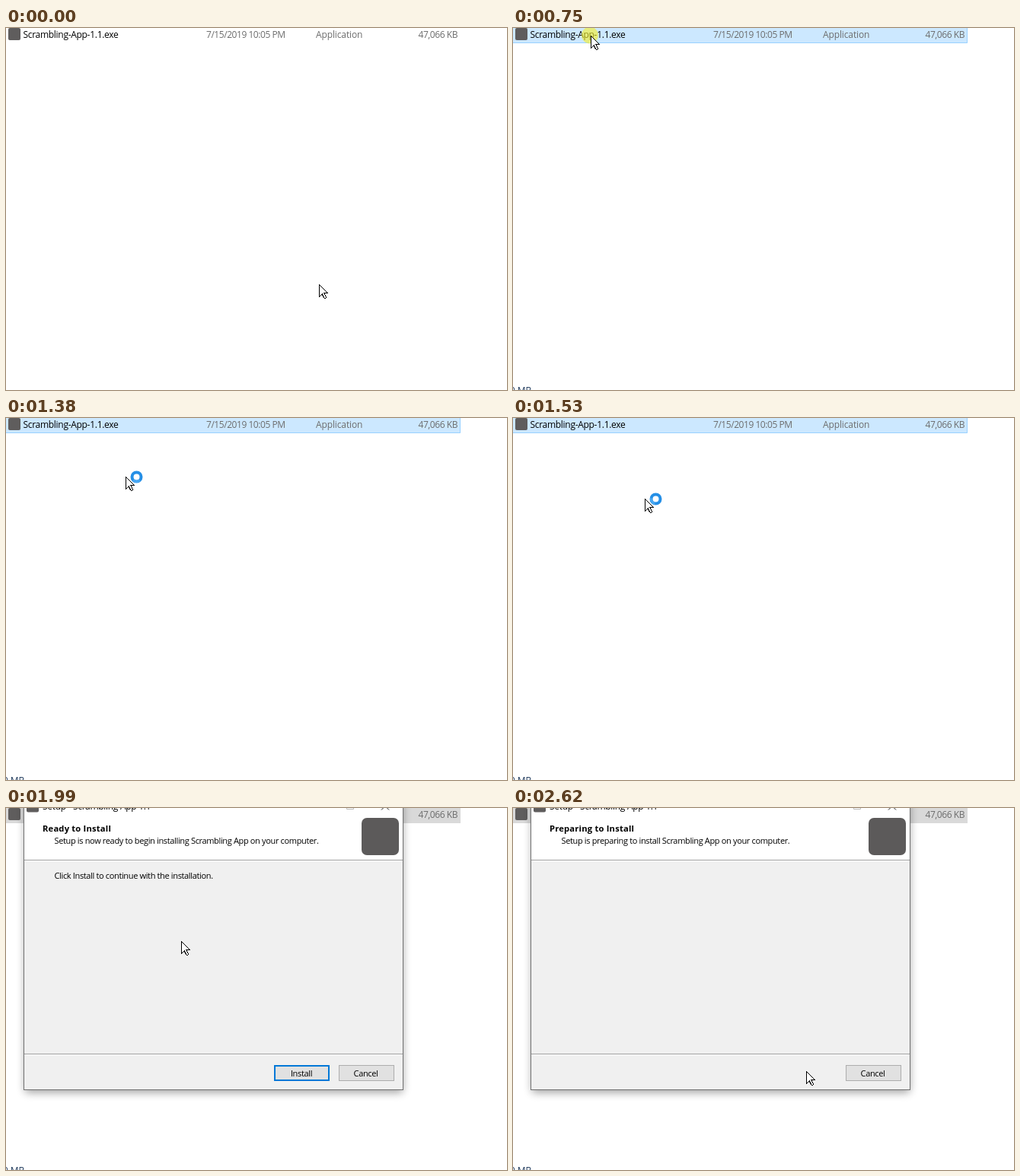
An HTML page that plays this animation: 658 px wide and 476 px high, repeating every 2.69 s.

```html
<!DOCTYPE html>
<html lang="en">
<head>
<meta charset="utf-8">
<title>Installer</title>
<style>
  html, body { margin: 0; width: 100%; height: 100%; overflow: hidden; background: #fff; }
  svg { display: block; width: 658px; height: 476px; }
  text { font-family: "Open Sans", "Noto Sans", sans-serif; fill: #000; }
  .ui { font-size: 12px; letter-spacing: -.3px; }
  .dim { fill: #6d6d6d; }
  .num { letter-spacing: -.45px; }
  .word { letter-spacing: -.12px; }
  .dlg { font-size: 11px; letter-spacing: -.35px; }
  .head { font-size: 11.2px; font-weight: 700; letter-spacing: .2px; }
  .mid { text-anchor: middle; }
</style>
</head>
<body>
<svg viewBox="0 0 658 476">
  <defs>
    <filter id="blur" x="-10%" y="-10%" width="120%" height="120%"><feGaussianBlur stdDeviation="6"/></filter>
  </defs>
  <rect width="658" height="476" fill="#fff"/>

  <g id="row">
    <rect id="rowFill" x="0" y="-2" width="597" height="22"/>
    <path id="rowEdge" d="M0 19.5H596.5V-2" fill="none" stroke="#99d1ff"/>
    <rect x="3" y="0" width="16" height="16" rx="2" fill="#5f5d5d"/>
    <text class="ui" x="22.5" y="13">Scrambling-App-1.1.exe</text>
    <text class="ui dim num" x="263" y="13">7/15/2019 10:05 PM</text>
    <text class="ui dim word" x="407" y="13">Application</text>
    <text class="ui dim num" x="593" y="13" text-anchor="end">47,066 KB</text>
  </g>
  <text id="status" class="ui word" x="-4" y="481" style="fill:#1e395b">0 MB</text>

  <g id="dialog">
    <rect x="25" y="-8" width="496" height="382" fill="#000" opacity=".38" filter="url(#blur)"/>
    <rect x="23.5" y="-20.5" width="498" height="391" fill="#f0f0f0" stroke="#707070"/>
    <rect x="24" y="-20" width="497" height="88" fill="#fff"/>
    <path d="M24 68.5H521M24 323.5H521" stroke="#a0a0a0"/>
    <path d="M24 69.5H521M24 324.5H521" stroke="#fff"/>
    <rect x="27" y="-10" width="16" height="15.5" rx="2" fill="#5f5d5d"/>
    <text class="ui" x="48" y="1.5">Setup - Scrambling App 1.1</text>
    <path d="M447.5 -7.5H456.5V1.5H447.5Z" fill="none" stroke="#bbb"/>
    <path d="M493 -7.5L503 2.5M503 -7.5L493 2.5" stroke="#222"/>
    <rect x="467" y="13" width="49" height="49" rx="7" fill="#5c5a5a"/>
    <text id="head" class="head" x="48" y="31"></text>
    <text id="sub" class="dlg" x="63.5" y="47"></text>
    <text id="hint" class="dlg" x="63.5" y="93">Click Install to continue with the installation.</text>
    <g id="install">
      <rect id="installBox" x="353" y="339" width="71" height="19" stroke-width="2"/>
      <text class="dlg mid" x="388" y="353">Install</text>
    </g>
    <rect x="437.5" y="338.5" width="72" height="20" fill="#e1e1e1" stroke="#adadad"/>
    <text class="dlg mid" x="472.5" y="353">Cancel</text>
  </g>

  <g id="pointer">
    <circle id="click" cx="-1" cy="-.5" r="11" fill="#f4ef2c" opacity=".62"/>
    <path d="M.5 .5V16.5L4.2 12.8 6.5 17.5 7.5 18.5H8.5L9.5 17.5 7 11.5H11.5Z" fill="#fff" stroke="#000" shape-rendering="crispEdges"/>
    <g id="busy" transform="translate(14.5 .5)">
      <circle r="6" fill="#fff" stroke="#258fe6" stroke-width="4"/>
      <path id="glint" d="M0 -6A6 6 0 0 1 6 0" fill="none" stroke="#4aa8f2" stroke-width="3"/>
    </g>
  </g>
</svg>
<script>
const LOOP = 2690;
const el = id => document.getElementById(id);
const show = (id, on) => { el(id).style.display = on ? "" : "none"; };
const set = (id, attrs) => { for (const k in attrs) el(id).setAttribute(k, attrs[k]); };
const within = (t, a, b) => t >= a && t < b;

// The screen refreshes only at these moments.
const ticks = [0, 70, 150, 230, 300, 380, 460, 530, 610, 750, 920, 990, 1070,
  1300, 1380, 1460, 1530, 1610, 1690, 1760, 1840, 1920, 1990, 2070, 2150, 2230,
  2310, 2390, 2460, 2540, 2620];

const linear = p => p;
const smooth = p => p * p * (3 - 2 * p);

// Pointer path: time, x, y, easing towards this point.
const path = [
  [0, 411, 337], [460, 98, 23, smooth], [530, 100, 15, linear], [610, 102, 10, linear],
  [1225, 102, 10, linear], [1380, 157, 77, linear], [1690, 190, 137, linear],
  [1990, 230, 175, linear], [2310, 383, 342, smooth], [2390, 385, 346, linear],
  [LOOP, 385, 346, linear]
];

function pointerAt(t) {
  const i = path.findIndex((k, n) => n && t <= k[0]);
  const [t0, x0, y0] = path[i - 1], [t1, x1, y1, ease] = path[i];
  const p = ease((t - t0) / (t1 - t0));
  return [Math.round(x0 + (x1 - x0) * p), Math.round(y0 + (y1 - y0) * p)];
}

function drawRow(t) {
  const fill = t < 530 ? "#fff" : t < 750 ? "#e5f3ff" : t < 1610 ? "#cce8ff" : "#d9d9d9";
  set("rowFill", { fill });
  show("rowEdge", within(t, 750, 1610));
  show("status", t >= 750);
}

function drawDialog(t, x, y) {
  show("dialog", t >= 1610);
  const [opacity, scale] = t < 1690 ? [.5, .965] : t < 1760 ? [.9, .992] : [1, 1];
  set("dialog", {
    opacity,
    transform: `translate(272.5 165) scale(${scale}) translate(-272.5 -165)`
  });

  const preparing = t >= 2620;
  el("head").textContent = preparing ? "Preparing to Install" : "Ready to Install";
  el("sub").textContent = preparing
    ? "Setup is preparing to install Scrambling App on your computer."
    : "Setup is now ready to begin installing Scrambling App on your computer.";
  show("hint", !preparing);
  show("install", !preparing);

  const hover = x >= 352 && x < 425 && y >= 338 && y < 359;
  const pressed = within(t, 2460, 2540);
  set("installBox", {
    fill: pressed ? "#cce4f7" : hover ? "#e5f1fb" : "#e1e1e1",
    stroke: pressed ? "#005499" : "#0078d7"
  });
}

function draw(time) {
  const t = ticks.filter(k => k <= time).pop();
  const [x, y] = pointerAt(t);
  drawRow(t);
  drawDialog(t, x, y);
  set("pointer", { transform: `translate(${x} ${y})` });
  show("click", within(t, 750, 920) || within(t, 990, 1070) || within(t, 2460, 2620));
  show("busy", within(t, 1070, 1610));
  set("glint", { transform: `rotate(${t * .36})` });
}

const start = performance.now();
function tick() {
  draw((performance.now() - start) % LOOP);
  requestAnimationFrame(tick);
}
draw(0);
requestAnimationFrame(tick);
</script>
</body>
</html>
```
